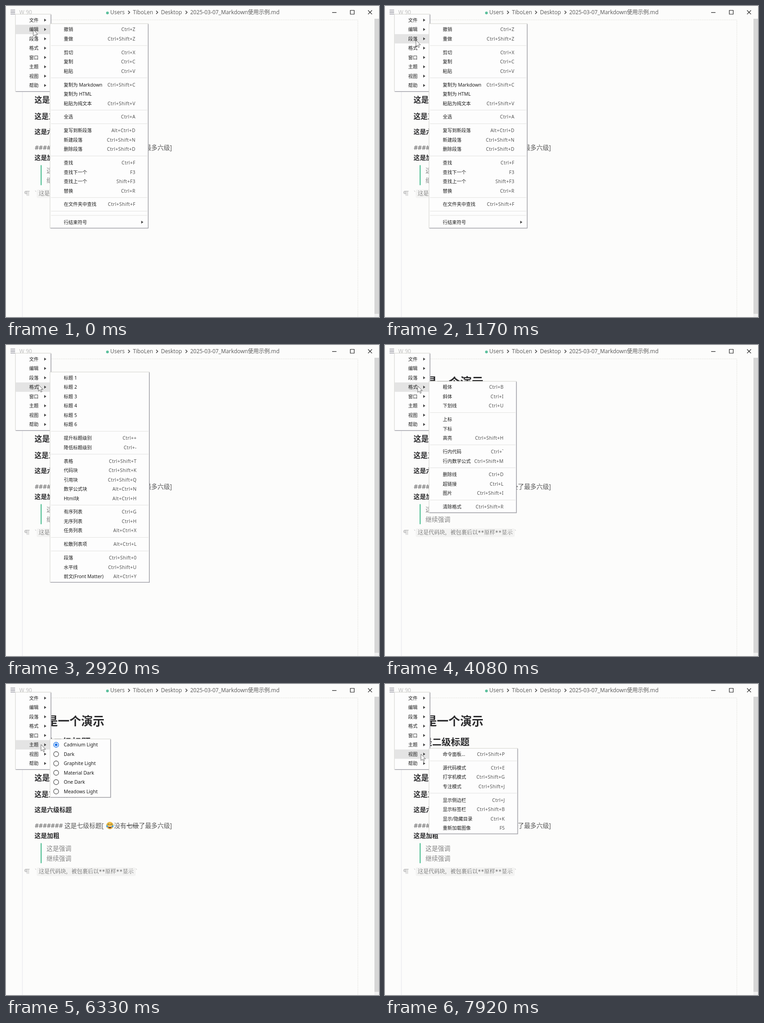
These frames come from a looping animation (820 px wide and 683 px high, 8 s). An HTML page:

```html
<!DOCTYPE html>
<html lang="zh-CN">
<head>
<meta charset="utf-8">
<title>Menu tour</title>
<style>
html, body { margin: 0; width: 100%; height: 100%; overflow: hidden; background: #fcfcfb; }
svg { display: block; width: 820px; height: 683px; }
text { white-space: pre; font-family: "Open Sans", "Noto Sans CJK SC", "Noto Sans CJK JP", sans-serif; }
.menu text { font: 10.25px "Noto Sans", "Noto Sans CJK SC", "Noto Sans CJK JP", sans-serif; fill: #1c1c1c; }
.menu .key { fill: #555; letter-spacing: .38px; text-anchor: end; }
.menu .latin { font-size: 10.45px; }
.code { font-family: "DejaVu Sans Mono", "Noto Serif CJK SC", "Noto Sans CJK SC", "Noto Sans CJK JP", monospace; }
</style>
</head>
<body>
<svg id="stage" viewBox="0 0 820 683"></svg>
<script>
const LOOP = 8000, STEP = 1000 / 12, OPEN_DELAY = 400;
const ROW = 20.5, GAP = 9.35, TOP = 31, MENU_X = 96.8;
const stage = document.getElementById('stage');

function add(parent, tag, attrs = {}, content) {
  const el = document.createElementNS('http://www.w3.org/2000/svg', tag);
  for (const name in attrs) el.setAttribute(name, attrs[name]);
  if (content !== undefined) el.textContent = content;
  parent.append(el);
  return el;
}
const group = attrs => add(stage, 'g', attrs);
const rect = (g, x, y, width, height, fill, extra) => add(g, 'rect', { x, y, width, height, fill, ...extra });
const path = (g, d, stroke, width = 1, extra) =>
  add(g, 'path', { d, stroke, fill: 'none', 'stroke-width': width, ...extra });
const circle = (g, cx, cy, r, fill, extra) => add(g, 'circle', { cx, cy, r, fill, ...extra });

// Text placed by its left edge and vertical centre.
const write = (g, x, cy, size, fill, content, extra) =>
  add(g, 'text', { x, y: cy + size * .38, 'font-size': size, fill, ...extra }, content);

function drawWindow() {
  const g = group();
  path(g, 'M10 9H20M10 13.3H20M10 17.5H20', '#5e5e70', 1.2);
  write(g, 29.3, 13, 11.95, '#bdbdbd', 'W 90');
  circle(g, 223, 15.3, 3, '#5bc09c');
  [[229.3, 'Users'], [279, 'TiboLen'], [340.7, 'Desktop'], [405, '2025-03-07_Markdown使用示例.md']]
    .forEach(([x, label]) => write(g, x, 13.8, 11.95, '#595959', label));
  for (const x of [268.5, 330.2, 394.8]) path(g, `M${x} 10.5l3.4 3.5l-3.4 3.5`, '#444', 1.6);
  path(g, 'M717 14.3H726.5M757 9.5h8.5v8.5h-8.5zM796 9.5l8.6 8.6M804.6 9.5l-8.6 8.6', '#222', 1.2);
  rect(g, 810, 28, 10, 655, '#f0f0f0');
  rect(g, 810, 28, 10, 648, '#d6d6d6');
  path(g, 'M36 30.5V683', '#e4e4ea');
  path(g, 'M36 30.5H773.5V683', '#e6e6e2', 1, { 'stroke-dasharray': '3 1' });
}

function drawEmoji(g, x, y) {
  const e = add(g, 'g', { transform: `translate(${x} ${y})` });
  circle(e, 0, 0, 7.6, '#f9c846', { stroke: '#b98a2a', 'stroke-width': .7 });
  path(e, 'M-5 -2q2 -2.5 4 0M1 -2q2 -2.5 4 0', '#5a4020', 1.1);
  add(e, 'path', { d: 'M-4.5 1H4.5Q4 6 0 6T-4.5 1Z', fill: '#6b3b22' });
  rect(e, -3.8, 1.2, 7.6, 1.5, '#fff');
  for (const s of [-1, 1]) add(e, 'ellipse', { cx: 6.2 * s, cy: 1.4, rx: 1.8, ry: 2.5, fill: '#4aa5dc' });
}

function drawDocument() {
  const g = group();
  [[81, 25.6, '这是一个演示'], [127, 20.5, '这是二级标题'], [168, 18.4, '这是三级标题'],
   [206, 16.7, '这是四级标题'], [242.3, 15.4, '这是五级标题'], [276, 13.67, '这是六级标题'],
   [332.5, 13.67, '这是加粗']]
    .forEach(([y, size, s]) => write(g, 62.8, y, size, '#2b2b2d', s, { 'font-weight': 700 }));

  const body = (x, y, s, fill = '#565656') => write(g, x, y, 13.67, fill, s);
  body(63.3, 310.6, '####### ');
  body(128.4, 310.6, '这是七级标题[');
  drawEmoji(g, 228.4, 310.8);
  body(237.4, 310.6, '没有七级了最多六级]');
  path(g, 'M264.8 311.2H292.2', '#444', 1.1);

  rect(g, 76.3, 349.5, 1.9, 44, '#35b584');
  body(89, 361.3, '这是强调', '#858585');
  body(89, 383.3, '继续强调', '#858585');

  add(g, 'path', { d: 'M46.5 406.5H44a3 3 0 0 0 0 6H46.5Z', fill: '#dcdcdc' });
  path(g, 'M52 406.7H44a2.9 2.9 0 0 0 0 5.8H46.5M46.5 406.7V417M49.7 406.7V417', '#bdbdbd', 1.2);
  rect(g, 67.5, 403, 217.5, 18.5, '#f3f3f2', { rx: 3 });
  const code = (x, fill, s) => write(g, x, 411.8, 11.97, fill, s, { class: 'code' });
  code(62, '#bbb', '`');
  code(72, '#626262', '这是代码块，被包裹后以**原样**显示');
  code(283.5, '#bbb', '`');
}

function panel(g, x, y, right, bottom) {
  rect(g, x, y, right - x, bottom - y, '#fdfdfd', { stroke: '#d2d2cc', 'stroke-width': 1 });
  path(g, `M${x + 1} ${bottom}H${right}V${y + 1}`, '#a6a6ad', 1.6);
}
const arrow = (g, x, y) => add(g, 'path', { d: `M${x} ${y - 3.2}l4.6 3.2l-4.6 3.2z`, fill: '#444' });

// Items are "label|shortcut"; "-" is a separator, ">" marks a nested menu, "o"/"*" a radio item.
const submenus = [
  null,
  { right: 312.6, items: ['撤销|Ctrl+Z', '重做|Ctrl+Shift+Z', '-', '剪切|Ctrl+X', '复制|Ctrl+C', '粘贴|Ctrl+V', '-',
    '复制为 Markdown|Ctrl+Shift+C', '复制为 HTML', '粘贴为纯文本|Ctrl+Shift+V', '-', '全选|Ctrl+A', '-',
    '复写到新段落|Alt+Ctrl+D', '新建段落|Ctrl+Shift+N', '删除段落|Ctrl+Shift+D', '-',
    '查找|Ctrl+F', '查找下一个|F3', '查找上一个|Shift+F3', '替换|Ctrl+R', '-',
    '在文件夹中查找|Ctrl+Shift+F', '-', '-', '行结束符号|>'] },
  { right: 315.2, items: ['标题 1', '标题 2', '标题 3', '标题 4', '标题 5', '标题 6', '-',
    '提升标题级别|Ctrl++', '降低标题级别|Ctrl+-', '-',
    '表格|Ctrl+Shift+T', '代码块|Ctrl+Shift+K', '引用块|Ctrl+Shift+Q', '数学公式块|Alt+Ctrl+N', 'Html块|Alt+Ctrl+H', '-',
    '有序列表|Ctrl+G', '无序列表|Ctrl+H', '任务列表|Alt+Ctrl+X', '-', '松散列表项|Alt+Ctrl+L', '-',
    '段落|Ctrl+Shift+0', '水平线|Ctrl+Shift+U', '前文(Front Matter)|Alt+Ctrl+Y'] },
  { right: 288.8, items: ['粗体|Ctrl+B', '斜体|Ctrl+I', '下划线|Ctrl+U', '-', '上标', '下标', '高亮|Ctrl+Shift+H', '-',
    '行内代码|Ctrl+`', '行内数学公式|Ctrl+Shift+M', '-', '删除线|Ctrl+D', '超链接|Ctrl+L', '图片|Ctrl+Shift+I', '-',
    '清除格式|Ctrl+Shift+R'] },
  { right: 247.8, items: ['最小化|Ctrl+M', '总在最前面', '-', '放大', '缩小', '-', '全屏显示|F11'] },
  { right: 230, items: ['Cadmium Light|*', 'Dark|o', 'Graphite Light|o', 'Material Dark|o', 'One Dark|o', 'Meadows Light|o'] },
  { right: 291.6, items: ['命令面板...|Ctrl+Shift+P', '-',
    '源代码模式|Ctrl+E', '打字机模式|Ctrl+Shift+G', '专注模式|Ctrl+Shift+J', '-',
    '显示侧边栏|Ctrl+J', '显示标签栏|Ctrl+Shift+B', '显示/隐藏目录|Ctrl+K', '重新加载图像|F5'] }
];

function drawRadio(g, y, checked) {
  circle(g, 110.2, y, 5.5, '#fff', { stroke: checked ? '#1a73e8' : '#5c5c5c', 'stroke-width': 1.3 });
  if (checked) circle(g, 110.2, y, 3, '#1a73e8');
}

function drawSubmenu(menu, row) {
  if (!menu) return null;
  const { right, items } = menu;
  const g = group({ class: 'menu' });
  const first = TOP + ROW * row;
  const gaps = items.filter(item => item === '-').length;
  panel(g, MENU_X, first - 12.7, right, first + (items.length - gaps - 1) * ROW + gaps * GAP + 13);
  let y = first - ROW / 2;
  for (const item of items) {
    if (item === '-') {
      path(g, `M${MENU_X + 2} ${y + GAP / 2}H${right - 2}`, '#e2e2e0');
      y += GAP;
      continue;
    }
    const [label, key] = item.split('|');
    const cy = y + ROW / 2, radio = key === '*' || key === 'o';
    write(g, 127, cy, 10.25, '', label, radio ? { class: 'latin' } : {});
    if (radio) drawRadio(g, cy, key === '*');
    else if (key === '>') arrow(g, 297.3, cy);
    else if (key) write(g, right - 28, cy, 10.25, '', key, { class: 'key' });
    y += ROW;
  }
  return g;
}

function drawMainMenu() {
  const g = group({ class: 'menu' });
  panel(g, 20.7, 18, 98.8, 187.8);
  const bar = rect(g, 21.2, 0, 76.8, ROW, '#e4e4e4');
  ['文件', '编辑', '段落', '格式', '窗口', '主题', '视图', '帮助'].forEach((label, i) => {
    write(g, 51, TOP + ROW * i, 10.25, '', label);
    arrow(g, 84, TOP + ROW * i);
  });
  return bar;
}

// Pointer stops: time, x, y.
const stops = [[0, 60, 52], [700, 60, 52], [1000, 68, 75], [2700, 68, 75], [3000, 72, 90], [4200, 72, 90],
  [4450, 74, 112], [5450, 74, 112], [5650, 77, 133], [6850, 77, 133], [7050, 79, 154], [LOOP, 79, 154]];

function pointerAt(time) {
  const t = Math.max(0, time);
  const i = stops.findIndex(stop => stop[0] > t);
  const [t0, x0, y0] = stops[i - 1], [t1, x1, y1] = stops[i];
  const k = (t - t0) / (t1 - t0), s = k * k * (3 - 2 * k);
  return { x: x0 + (x1 - x0) * s, y: y0 + (y1 - y0) * s };
}
const rowAt = time => Math.round((pointerAt(time).y - TOP) / ROW);

drawWindow();
drawDocument();
const highlight = drawMainMenu();
const panels = submenus.map(drawSubmenu);
const pointer = add(stage, 'path', {
  d: 'M0 0V14.2L3.3 11.2L5.5 16.2L7.7 15.2L5.6 10.3H10Z', fill: '#fff', stroke: '#555', 'stroke-width': .9
});

function render(time) {
  const t = Math.floor(time % LOOP / STEP) * STEP;
  const { x, y } = pointerAt(t);
  pointer.setAttribute('transform', `translate(${x} ${y})`);
  highlight.setAttribute('y', TOP + ROW * (rowAt(t) - .5));
  const open = rowAt(t - OPEN_DELAY);
  panels.forEach((g, row) => g && g.setAttribute('visibility', row === open ? 'visible' : 'hidden'));
}

const start = performance.now();
function tick() {
  render(performance.now() - start);
  requestAnimationFrame(tick);
}
tick();
</script>
</body>
</html>
```
